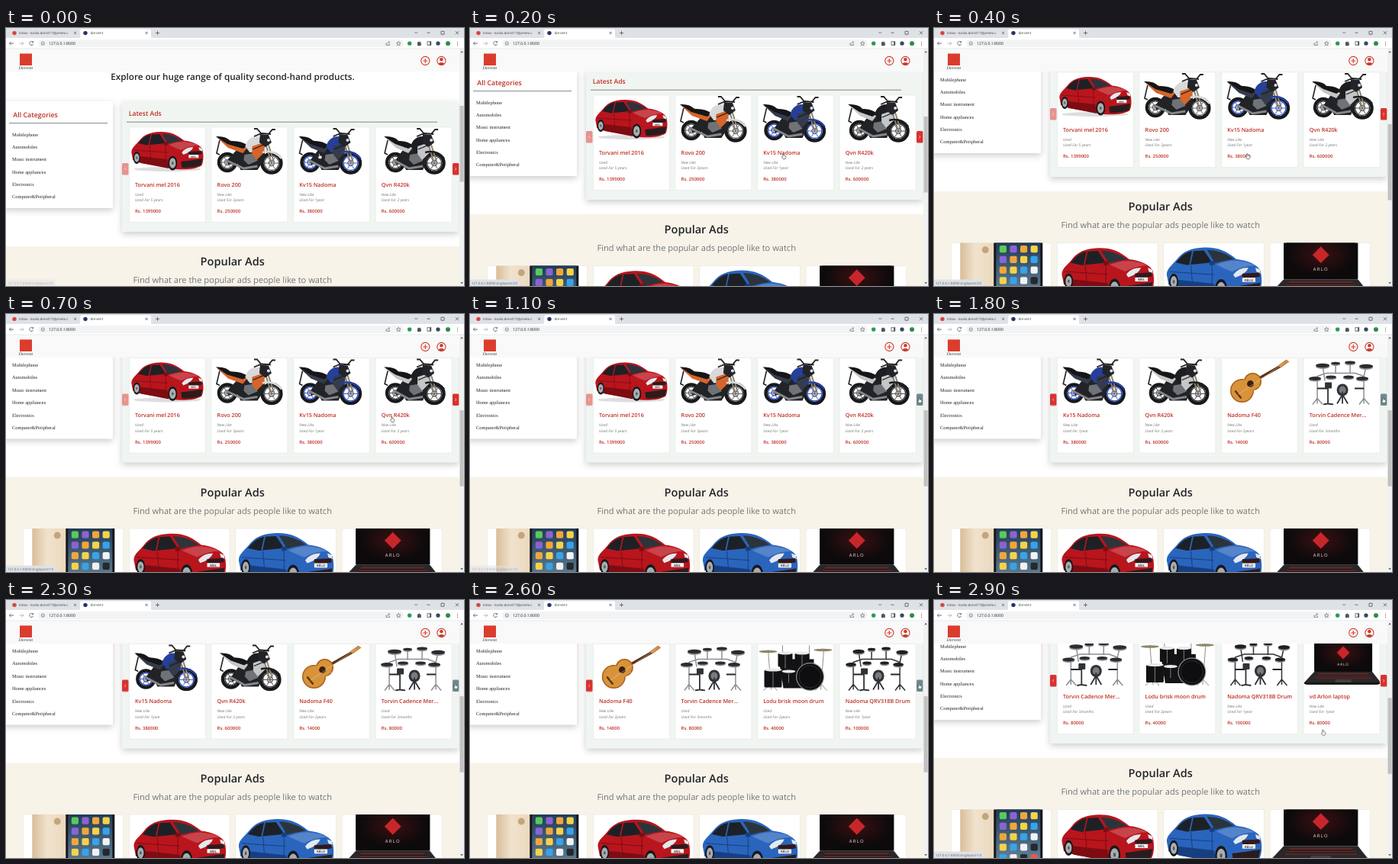
An HTML page that plays this animation: 600x338 px, repeating every 3 s.

```html
<!DOCTYPE html>
<html lang="en">
<head>
<meta charset="utf-8">
<title>Second-hand shop</title>
<style>
@property --scroll { syntax: '<number>'; inherits: true; initial-value: 0; }
@property --slide { syntax: '<number>'; inherits: true; initial-value: 0; }
html, body { margin: 0; width: 100%; height: 100%; overflow: hidden; background: #fff; }
svg { display: block; width: 600px; height: 338px; animation: scroll 3s step-end infinite; }
text { font-family: "Open Sans", "Noto Sans", sans-serif; text-rendering: geometricPrecision; white-space: pre; }
.bold { font-weight: 600; }
.red { fill: #bf2f24; }
.mid { text-anchor: middle; }
.serif { font-family: "Liberation Serif", serif; }
.line { fill: none; stroke: #555; }
.panel { filter: drop-shadow(0 3px 4px #0003); }
.card { fill: #fff; stroke: #e3e6e3; stroke-width: .6; }
#page { transform: translateY(calc(var(--scroll) * -1px)); }
#thumb { transform: translateY(calc(var(--scroll) * .333px)); }
#track { transform: translateX(calc(var(--slide) * -107.6px)); animation: slide 3s step-end infinite; }
#prev { animation: prev 3s step-end infinite; }
#next { animation: next 3s step-end infinite; }
#hand { animation: hand 3s step-end infinite; }
.status { opacity: 0; animation: 3s step-end infinite; }
#s20 { animation-name: s20; }
#s19 { animation-name: s19; }
#s14 { animation-name: s14; }

@keyframes scroll {
  0% { --scroll: 0; } 3.33% { --scroll: 14; } 6.66% { --scroll: 42; } 10% { --scroll: 64; }
  13.33% { --scroll: 72; } 20% { --scroll: 72.5; } 93.33% { --scroll: 74; } 96.66%, 100% { --scroll: 79; }
}
@keyframes slide {
  0% { --slide: 0; } 43.33% { --slide: .1; } 46.66% { --slide: .444; } 50% { --slide: .9; }
  53.33% { --slide: 1.4; } 56.66% { --slide: 1.85; } 60% { --slide: 2; }
  80% { --slide: 2.4; } 83.33% { --slide: 3.1; } 86.66% { --slide: 4; } 90% { --slide: 4.75; }
  93.33%, 100% { --slide: 5; }
}
@keyframes prev { 0% { opacity: .5; } 43.33%, 100% { opacity: 1; } }
@keyframes next { 0% { fill: #d8322f; } 33.33% { fill: #6f8b8f; } 90%, 100% { fill: #d8322f; } }
@keyframes hand {
  0% { transform: translate(411px, 168px); }
  16.66% { transform: translate(428px, 161px); }
  20% { transform: translate(464px, 150px); }
  23.33% { transform: translate(506px, 138px); }
  26.66% { transform: translate(546px, 125px); }
  30% { transform: translate(575px, 116px); }
  33.33% { transform: translate(589px, 113px); }
  90% { transform: translate(566px, 130px); }
  93.33% { transform: translate(530px, 157px); }
  96.66%, 100% { transform: translate(510px, 173.5px); }
}
@keyframes s20 { 0% { opacity: .45; } 3.33% { opacity: 1; } 23.33%, 100% { opacity: 0; } }
@keyframes s19 { 0% { opacity: 0; } 23.33% { opacity: 1; } 36.66% { opacity: .5; } 40%, 100% { opacity: 0; } }
@keyframes s14 { 0% { opacity: 0; } 93.33% { opacity: .6; } 96.66%, 100% { opacity: 1; } }
</style>
</head>
<body>
<svg id="stage" viewBox="0 0 600 338">
  <defs>
    <clipPath id="window"><rect x="157.6" y="125" width="429.4" height="135"/></clipPath>
    <clipPath id="photo"><rect width="100" height="62"/></clipPath>
    <clipPath id="tile"><rect width="131.4" height="100"/></clipPath>
    <linearGradient id="screen" x2="0" y2="1"><stop stop-color="#1c3550"/><stop offset="1" stop-color="#86a9bd"/></linearGradient>
    <linearGradient id="gold"><stop stop-color="#d8bd98"/><stop offset=".3" stop-color="#f0e2cd"/><stop offset="1" stop-color="#e6d2b4"/></linearGradient>
    <radialGradient id="glow"><stop stop-color="#3a1012"/><stop offset="1" stop-color="#0c0a0b"/></radialGradient>
  </defs>

  <g id="page">
    <text class="bold mid" x="297" y="68.4" font-size="11.7" fill="#212529">Explore our huge range of quality second-hand products.</text>

    <rect class="panel" x="-4" y="96" width="144" height="140" fill="#fff"/>
    <text class="bold red" x="9.3" y="117.2" font-size="8.9">All Categories</text>
    <path class="line" d="M4 124.6H133" stroke-width=".7"/>
    <g id="menu"></g>

    <rect class="panel" x="152" y="96" width="441" height="171" fill="#f0f5f2"/>
    <text class="bold red" x="160.8" y="114.6" font-size="8.6">Latest Ads</text>
    <path class="line" d="M158 123.2H565" stroke-width=".7"/>
    <g clip-path="url(#window)"><g id="track"></g></g>
    <g id="prev"><rect x="152" y="177" width="8.5" height="15.5" rx="1.5" fill="#d8322f"/><path d="M156.8 183l-1.2 1.8 1.2 1.8" fill="none" stroke="#fff" stroke-width=".6"/></g>
    <rect id="next" x="585" y="177" width="8.3" height="15.5" rx="1.5"/>
    <path d="M588.5 183l1.2 1.8-1.2 1.8" fill="none" stroke="#fff" stroke-width=".6"/>

    <rect y="286" width="594" height="200" fill="#f8f3e8"/>
    <text class="bold mid" x="296.7" y="311.4" font-size="14.5" fill="#212529">Popular Ads</text>
    <text class="mid" x="296.7" y="334" font-size="11.1" fill="#6f7678">Find what are the popular ads people like to watch</text>
    <g id="popular"></g>
  </g>

  <g id="scrollbar">
    <rect x="594" y="27" width="6" height="311" fill="#f1f1f1"/>
    <rect id="thumb" x="594.6" y="102" width="5" height="99.5" fill="#c1c1c1"/>
    <path d="M595.4 32.2l1.7-2.2 1.7 2.2zM595.4 333l1.7 2.2 1.7-2.2z" fill="#555"/>
  </g>

  <g id="navbar">
    <rect y="27" width="594" height="30" fill="#f8f9f8"/>
    <rect x="18" y="33.5" width="16" height="15.5" fill="#dc3c2e"/>
    <text class="serif mid" x="26" y="53.6" font-size="5.6" font-style="italic" fill="#333">Dorvent</text>
    <g fill="none" stroke="#cf3a2c" stroke-width="1.1">
      <circle cx="549.3" cy="43" r="5.6"/><path d="M546.3 43h6M549.3 40v6"/>
      <circle cx="570.4" cy="43" r="5.6"/>
    </g>
    <path d="M566.5 47.2c1-3 6.8-3 7.8 0c-2 2-5.8 2-7.8 0z" fill="#cf3a2c"/><circle cx="570.4" cy="41.3" r="2.2" fill="#cf3a2c"/>
  </g>

  <g id="browser">
    <rect width="600" height="14" fill="#dee1e6"/>
    <path d="M95 13.5q2 0 2-2V3.5q0-2 2-2H188q2 0 2 2v8q0 2 2 2z" fill="#fff"/>
    <rect y="13" width="600" height="14" fill="#fff"/>
    <path d="M0 27H600" stroke="#dcdfe2" stroke-width=".6"/>
    <circle cx="11" cy="6.6" r="2.7" fill="#d9453a"/>
    <text x="17" y="8.4" font-size="4.35" fill="#3c4043">Inbox - kavila.dom417@pmelo.c</text>
    <circle cx="104" cy="6.6" r="2.7" fill="#27306b"/>
    <text x="110.5" y="8.4" font-size="4.6" fill="#3c4043">dorvent</text>
    <rect x="42" y="15.3" width="479" height="9.8" rx="4.9" fill="#f1f3f4"/>
    <text x="56" y="22.2" font-size="5.15" fill="#202124">127.0.0.1:8000</text>
    <g fill="none" stroke="#50555a" stroke-width=".8">
      <path d="M89 4.9l3.2 3.2m0-3.2l-3.2 3.2M182.5 4.9l3.2 3.2m0-3.2l-3.2 3.2M196 6.5h5m-2.5-2.5v5"/>
      <path d="M535.5 5.3l1.8 1.8 1.8-1.8M551.5 6.3h4M570 4.3h4v4h-4zM589 4.3l4 4m0-4l-4 4"/>
      <path d="M10 20.2H4.5l2.3-2.3m-2.3 2.3l2.3 2.3"/>
      <path d="M17.5 20.2H23l-2.3-2.3m2.3 2.3l-2.3 2.3" stroke="#a9adb1"/>
      <path d="M35.3 18.6a2.5 2.5 0 1 0 .3 2.3M35.7 17v1.9h-1.9"/>
      <circle cx="48.3" cy="20.2" r="2.1" stroke-width=".6"/><path d="M48.3 19.9v1.4" stroke-width=".6"/>
      <path d="M498 19.5v3h4.5v-2M499.5 21q.5-2.5 3-2.5m-1.2-1.3l1.4 1.3-1.4 1.3" stroke-width=".6"/>
      <path d="M514.3 17.4l.8 1.9 2 .1-1.5 1.4.5 2-1.8-1.1-1.8 1.1.5-2-1.5-1.4 2-.1z" stroke-width=".6"/>
      <rect x="552" y="17.8" width="4.8" height="4.8"/>
    </g>
    <path d="M555 17.8h1.8v4.8h-1.8zM539 18.6h1.4q.8-2 1.7 0h1.5v1.6q1.5.8 0 1.5v1.5H539z" fill="#50555a"/>
    <circle cx="528.7" cy="20.2" r="2.7" fill="#2f9a56"/>
    <circle cx="566" cy="20.2" r="2.6" fill="#34495e"/>
    <circle cx="579" cy="20.2" r="3" fill="#2c8c4a"/>
    <path d="M591.5 17.8v.9m0 1.2v.9m0 1.2v.9" stroke="#50555a"/>
  </g>

  <g id="statuses"></g>
  <path id="hand" d="M-1.1 .4V-3.3q.6-.7 1.2 0v2.3l2.2.5q.6.2.6 1v1.300L2.100 3.600H-.9L-2.500 1.200q0-.9.700-.7z" fill="#fff" stroke="#111" stroke-width=".5"/>
</svg>

<script>
const $ = id => document.getElementById(id);
const path = (d, fill) => `<path d="${d}" fill="${fill}"/>`;
const stroke = (d, color, w = 1) => `<path d="${d}" fill="none" stroke="${color}" stroke-width="${w}"/>`;
const disc = (x, y, r, fill, ry = r) => `<ellipse cx="${x}" cy="${y}" rx="${r}" ry="${ry}" fill="${fill}"/>`;
const ring = (x, y, r, color, w) => `<circle cx="${x}" cy="${y}" r="${r}" fill="none" stroke="${color}" stroke-width="${w}"/>`;
const box = (x, y, w, h, fill, r = 0) => `<rect x="${x}" y="${y}" width="${w}" height="${h}" rx="${r}" fill="${fill}"/>`;
const label = (x, y, size, str, attr) => `<text x="${x}" y="${y}" font-size="${size}" ${attr}>${str}</text>`;
const move = (x, y, body, s = 1) => `<g transform="translate(${x} ${y}) scale(${s})">${body}</g>`;

const tyre = (x, y, rx, ry) => disc(x, y, rx, '#17181a', ry) + disc(x, y, rx * .7, '#a9adb2', ry * .7) + disc(x, y, rx * .22, '#55585c', ry * .22);

const car = (paint, dark, plate) =>
  disc(50, 55, 44, '#0002', 3) +
  path('M3 33C3 27 8 24 13 18C19 10 27 6.500 40 6C53 5.500 62 9 72 17.500C84 19 93 23 96 29C98 36 97.500 46 95 50C88 55 74 56 62 55L16 47L5 43Z', paint) +
  path('M5 37L50 42L52 54L16 47L5 43Z', dark) +
  path('M12 21Q20 10.500 28 9.500L40 9L48 21L23 23.500Z', '#1d2126') +
  stroke('M29 9l-3 14', paint, 1.300) +
  path('M43 8.500Q57 8.500 70 17.500Q60 19 51 21.500Z', '#2c343b') +
  path('M52 23Q62 19 72 19Q84 20 91 24Q79 24 68 30Q60 27 52 23Z', '#fff3') +
  stroke('M6 30L50 33M27 24L29 47M48 23L48 50', dark, .8) +
  path('M69 33Q74 26 84 26Q82 32 71 36ZM91 26L95.500 28L96 32L92 30Z', '#e4e9ed') +
  path('M78 32L95 31L95.500 35Q86 37 78 36Z', '#33191c') +
  path('M68 45Q84 43 96 41L94 50Q82 54 69 53Z', '#2a1c1e') +
  box(78, 36, 13, 4.200, '#f4f4f4', .5) + label(84.500, 39.500, 3.400, plate, 'class="bold mid" fill="#222"') +
  tyre(10, 40, 4.500, 8) + tyre(57, 47, 6, 9.500) +
  path('M45 20l5-1 1 4-5 1z', dark);

const bike = (x, w, rim, tank, side) => {
  const m = w / 2, f = w - 17;
  const wheel = (cx, cy, r) => ring(cx, cy, r, '#18191b', 4.400) + ring(cx, cy, r - 3, rim, 1.400) +
    stroke(`M${cx - r + 3} ${cy}h${2 * r - 6}M${cx - 4} ${cy - 7}l8 14M${cx + 4} ${cy - 7}l-8 14`, rim, .9) + ring(cx, cy, 3.500, '#666', 1.400);
  return move(x, 0,
    wheel(16, 46, 11) + wheel(f, 47, 12.500) +
    path(`M17 42L${m - 12} 24H${m + 18}L${f - 8} 40L${m + 10} 56H${m - 12}L${m - 16} 48L17 49Z`, '#222327') +
    path(`M${m - 7} 36l13-2 4 10-12 5-6-6z`, '#6f7276') +
    stroke(`M${m + 10} 51L${m - 8} 54L14 43`, '#84868a', 2.800) +
    path(`M2 13L16 16L${m - 2} 25L${m - 9} 34L17 27Z`, side) +
    path(`M1 12Q14 11 20 18Q${m - 12} 17 ${m - 2} 24L${m - 9} 28L16 22Z`, '#161618') +
    stroke('M6 17L2 34l4 2', '#222', 1.600) +
    path(`M${m - 6} 25C${m - 3} 12 ${m + 10} 8 ${m + 20} 16L${m + 15} 32L${m} 33Z`, tank) +
    path(`M${m + 3} 25l18-6-3 15-9 9-6-8z`, side) + stroke(`M${m + 4} 29l14-6`, '#17181a', 1.200) +
    stroke(`M${f - 11} 12L${f} 47M${f - 7} 14L${f + 3} 45`, '#8a8170', 2) +
    stroke(`M${f - 12} 33Q${f + 3} 29 ${f + 13} 41`, tank, 2.400) +
    path(`M${f - 15} 9l11 1 4 10-8 6-8-6z`, '#222428') + disc(f - 4, 17, 2, '#dfe6ea') +
    stroke(`M${f - 23} 12l10-4 12 1M${f - 13} 9l-6-7h-4M${f - 4} 9l5-6h4`, '#222', 1.800));
};

const guitar = () =>
  stroke('M40 32L77 11', '#5a3216', 3.600) + path('M74 10L85 2L89 5L78 13Z', '#c98b4a') +
  disc(27, 43, 15.500, '#a85f1a') + disc(41, 31, 11.500, '#a85f1a') +
  disc(27, 43, 14, '#d8933a') + disc(41, 31, 10, '#d8933a') + path('M29 28L50 37L41 43L30 36Z', '#d8933a') +
  disc(38, 34, 4.400, '#3a2010') + stroke('M18 43l8 10', '#5a3216', 2.400) + stroke('M22 48L82 7', '#e8d9b8', .5);

// Electronic kit: pads on a tubular rack.
const rack = (tube, skin, size) => {
  const pads = [[25, 10, 9], [42, 7, 6], [61, 6, 7], [82, 11, 9], [15, 27, 8], [36, 25, 7], [59, 25, 7], [77, 27, 8]];
  return stroke('M18 60V24L30 20H68L79 24V60M25 10l3 20M42 7v14M61 6v15M82 11l-4 18M12 61l6-8 7 8M73 61l6-8 7 8', tube, 1.500) +
    stroke('M18 40H32M67 40H79', '#26272a', 2) +
    pads.map(([x, y, r]) => disc(x, y + 1.400, r * size, '#8b8f93', r * .34) + disc(x, y, r * size, skin, r * .3)).join('') +
    box(28, 32, 9, 8, '#303236', 1) + disc(51, 42, 7.500, '#303236', 8) + disc(51, 42, 4.500, '#777b80', 5) +
    stroke('M51 48L44 60M51 48l7 12M51 44v16M32 40v20l-6 1M32 60l7 1', '#303236', 1.800);
};

const drums = () =>
  stroke('M14 8L18 60M87 8L83 60M33 2v20M68 2v20M8 61l10-9 8 9M76 61l7-9 8 9', '#8b8f93', 1) +
  disc(14, 10, 12, '#8f8668', 1.800) + disc(86, 8, 12, '#8f8668', 1.800) +
  path('M28 20H74V58H34Z', '#141416') +
  [[27, 12, 19, 18], [49, 12, 19, 17], [9, 34, 23, 23], [32, 36, 18, 13]].map(([x, y, w, h]) =>
    box(x, y, w, h, '#121214', 1.500) + disc(x + w / 2, y, w / 2, '#e9e9ea', 2) + stroke(`M${x + w / 2} ${y + 2}v${h}`, '#999', .8)).join('') +
  disc(69, 43, 18.500, '#8d9093') + disc(69, 43, 17.300, '#0e0e10') + ring(69, 43, 14.500, '#2c2c30', 1);

const laptop = () =>
  box(14, -6, 76, 49, '#0b0b0c', 1) + box(16.500, -4, 71, 43, 'url(#glow)') +
  '<rect x="46" y="12" width="12" height="12" fill="#c9262c" transform="rotate(45 52 18)"/>' +
  label(52, 34.600, 4.600, 'ARLO', 'class="mid" letter-spacing="1" fill="#e6e6e6"') +
  path('M14 43H90L101 57Q100 60 96 60H5Q1 60 1 57Z', '#2b2728') +
  path('M20 45H84L89 52H15Z', '#5a2a2b') + stroke('M18 47.500H86M17 50H87', '#1b1718', .9) +
  path('M42 53h20l1 4H41z', '#454041') + stroke('M1 58H101', '#151516', 2);

const phone = () => {
  const tints = ['#5ac85a', '#f2f2f2', '#f0a63a', '#e5574f', '#37a3e8', '#8a63d2', '#26282c', '#f4d24a'];
  const icons = Array.from({ length: 24 }, (_, i) =>
    box(63.500 + i % 4 * 13.600, 3.500 + Math.floor(i / 4) * 13.700, 9.200, 9.200, tints[(i * 5 + (i >> 2)) % 8], 2));
  return box(12, -12, 64, 120, 'url(#gold)', 7) + disc(45, 9, 4.500, '#c4a57a') +
    box(56, -10, 64, 120, '#14161b', 6) + box(59, -6, 58, 110, 'url(#screen)') + icons.join('');
};

const redCar = car('#b9151d', '#7d0c13', 'MEL');
const blueCar = car('#2a65bd', '#173f80', 'KELU');

const ads = [
  ['Torvani mel 2016', 'Used', '5 years', 1399000, redCar],
  ['Rovo 200', 'New Like', '3years', 250000, bike(5, 91, '#55565a', '#d8d9da', '#d5652a')],
  ['Kv15 Nadoma', 'New Like', '1year', 380000, bike(6, 86, '#2b4fd0', '#263f9a', '#343b4c')],
  ['Qvn R420k', 'New Like', '2 years', 600000, bike(10, 84, '#3a3b3e', '#1d1e20', '#c4c6c8')],
  ['Nadoma F40', 'New Like', '2years', 14000, guitar()],
  ['Torvin Cadence Mer...', 'Used', '3months', 80000, rack('#8c9094', '#2b2c30', 1)],
  ['Lodu brisk moon drum', 'Used', '2years', 40000, drums()],
  ['Nadoma QRV318B Drum', 'New Like', '1year', 100000, rack('#303236', '#1f2022', .85)],
  ['vd Arlon laptop', 'New Like', '1year', 80000, laptop()]
];

$('track').innerHTML = ads.map(([name, state, age, price, art], i) => move(161.3 + i * 107.6, 130,
  '<rect class="card" width="100" height="124.5"/>' +
  `<g clip-path="url(#photo)">${art}</g>` +
  label(7.7, 77.9, 7.2, name, 'class="bold red"') +
  label(7.7, 89.8, 5, state, 'font-style="italic" fill="#777"') +
  label(7.7, 97.4, 5, 'Used For ' + age, 'font-style="italic" fill="#777"') +
  label(7.7, 112.2, 6, 'Rs. ' + price, 'class="bold red"'))).join('');

$('popular').innerHTML = [
  phone(),
  move(2, -1, redCar, 1.28),
  move(0, -2, blueCar, 1.32),
  move(0, -7.5, laptop(), 1.28)
].map((art, i) => move(22.3 + i * 139.3, 353.6,
  `<rect class="card" width="131.4" height="150"/><g clip-path="url(#tile)">${art}</g>`)).join('');

$('menu').innerHTML = ['Mobilephone', 'Automobiles', 'Music instrument', 'Home appliances', 'Electronics', 'Computer&amp;Peripheral']
  .map((item, i) => label(8, 141.6 + i * 16.35, 6.4, item, 'class="serif" fill="#222"')).join('');

$('statuses').innerHTML = [20, 19, 14].map(id =>
  `<g id="s${id}" class="status">${box(-2, 329.5, 66.5, 10, '#dfe2e6', 1.5)}${label(2, 335.6, 4.48, '127.0.0.1:8000/singlepost/' + id, 'fill="#5f6368"')}</g>`).join('');
</script>
</body>
</html>
```
